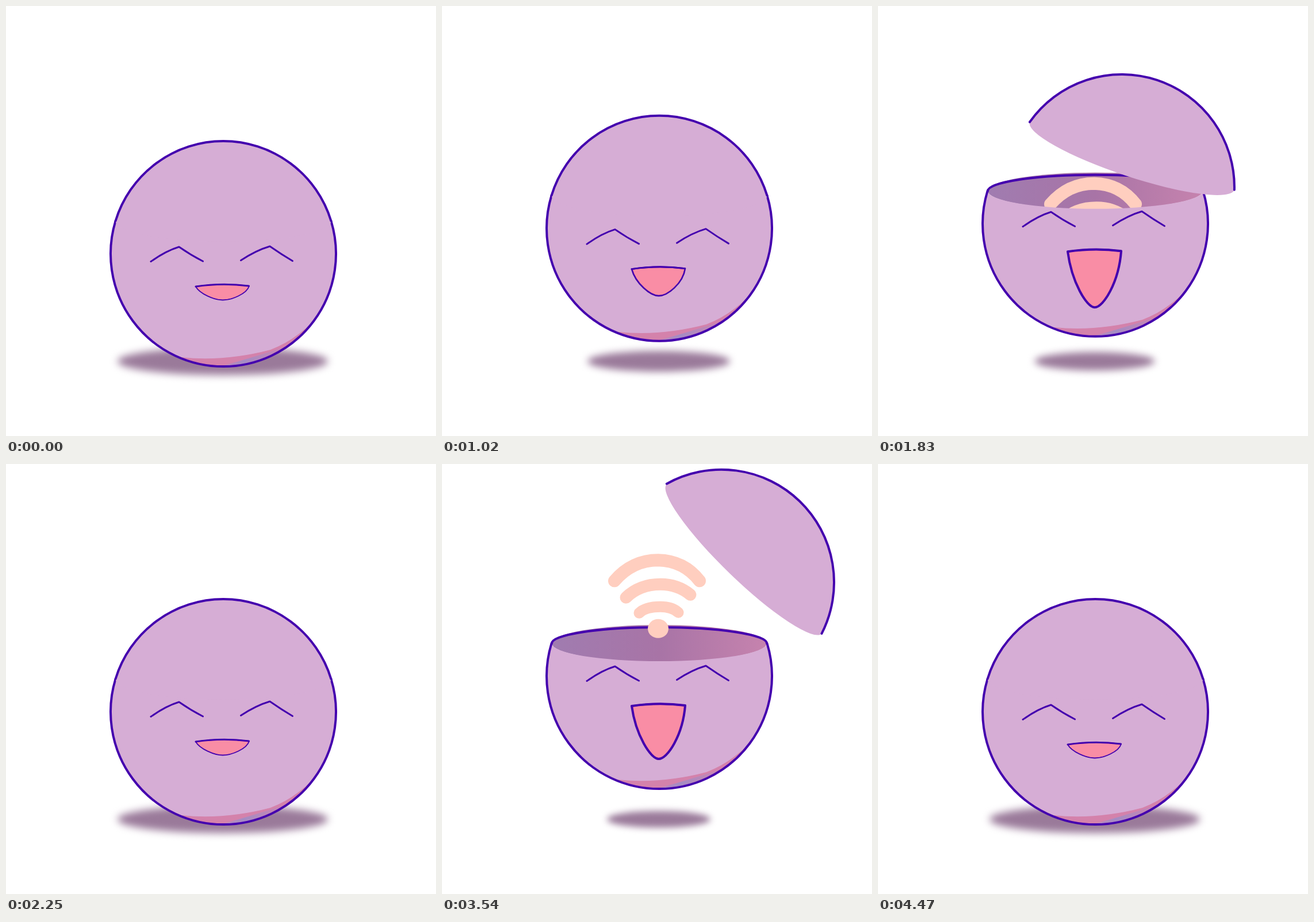
Write an HTML page that moves like this. It is 748 by 748 pixels and loops after 4.5 s.

```html
<!DOCTYPE html>
<html lang="en">
<head>
<meta charset="utf-8">
<title>Bouncing ball</title>
<style>
html, body { margin: 0; width: 100%; height: 100%; overflow: hidden; background: #fff; }
svg { display: block; width: 100vw; height: 100vh; }
.line { fill: none; stroke: #4400ae; stroke-width: 4; stroke-linecap: round; stroke-linejoin: round; }
.skin { fill: #d6add5; }
.thin { stroke-width: 3; }
#wifi path { fill: none; stroke: #ffcebf; stroke-width: 21; stroke-linecap: round; }
</style>
</head>
<body>
<svg viewBox="0 0 748 748">
  <defs>
    <linearGradient id="hollow">
      <stop offset="0" stop-color="#a07cb0"/>
      <stop offset=".5" stop-color="#a874a6"/>
      <stop offset="1" stop-color="#c683ae"/>
    </linearGradient>
    <linearGradient id="glint">
      <stop offset="0" stop-color="#c488b6"/>
      <stop offset=".35" stop-color="#a48cc4"/>
      <stop offset="1" stop-color="#d084ae"/>
    </linearGradient>
  </defs>
  <ellipse id="shadow" cx="377" cy="618" fill="#9a7a9a"/>
  <g id="body">
    <circle id="plate" class="skin" cx="378" cy="431" r="196"/>
    <g id="inside">
      <ellipse cx="378" cy="374" rx="187" ry="32" fill="url(#hollow)"/>
      <path class="line" d="M191 374A187 28 0 0 1 565 374"/>
      <g id="wifi" fill="#ffcebf">
        <path d="M300 265Q331 229 376 229Q421 230 448 265" style="stroke-width:22"/>
        <path d="M320 294Q344 271 380 271Q410 271 432 289"/>
        <path d="M343 321Q354 310 380 310Q400 310 411 320" style="stroke-width:19"/>
        <ellipse cx="376" cy="348" rx="18" ry="16.500"/>
      </g>
    </g>
    <path class="skin" d="M190.500 374A196 196 0 1 0 565.500 374A187.500 31 0 0 1 190.500 374"/>
    <path fill="#d482ab" d="M305 611Q380 619 460 598Q500 583 534 549A196 196 0 0 1 305 613"/>
    <path fill="url(#glint)" d="M372 627Q440 609 492 590A196 196 0 0 1 372 627"/>
    <path class="line" d="M190.500 374A196 196 0 1 0 565.500 374"/>
    <g id="lid">
      <path class="skin" d="M190.500 374A196 196 0 0 1 565.500 374A187.500 36 0 0 1 190.500 374"/>
      <path class="line" d="M190.500 374A196 196 0 0 1 565.500 374"/>
    </g>
  </g>
  <g id="face">
    <path class="line thin" d="M252 439.500Q278 421 301 414Q321 428 342.500 439"/>
    <path class="line thin" d="M408.500 437.500Q435 420 459 413Q479 427 498.500 438.500"/>
    <path id="mouth" class="line" style="fill:#f98da5"/>
    <path class="line thin" d="M330 483Q376 476 422.500 482"/>
  </g>
</svg>
<script>
const LOOP = 4500, STEP = 30, RISE = 62;
const el = id => document.getElementById(id);
const [shadow, body, plate, inside, wifi, lid, face, mouth] =
  ['shadow', 'body', 'plate', 'inside', 'wifi', 'lid', 'face', 'mouth'].map(el);

const mix = (a, b, k) => a + (b - a) * k;
const span = (u, from, to) => Math.min(1, Math.max(0, (u - from) / (to - from)));
const cubic = x => x < .5 ? 4 * x ** 3 : 1 - 4 * (1 - x) ** 3;
const sine = x => (1 - Math.cos(Math.PI * x)) / 2;
const outCubic = x => 1 - (1 - x) ** 3;
const move = (node, x, y, extra = '') =>
  node.setAttribute('transform', `translate(${x} ${y}) ${extra}`);

function draw(t) {
  const second = t >= 2700;
  let u = Math.max(0, t - (second ? 2700 : 660));
  // The second landing is slower than the first
  if (second && u > 960) u = 960 + (u - 960) * 630 / 810;

  const drop = cubic(span(u, 1000, 1500));
  const up = cubic(span(u, 0, 615)) - drop;
  const small = cubic(span(u, 0, 655)) - drop;
  move(body, 0, -RISE * up);
  shadow.setAttribute('rx', mix(183, 90, small));
  shadow.setAttribute('ry', mix(24, 14.5, small));
  shadow.style.filter = `blur(${mix(7, 6, small)}px)`;

  const back = sine(span(u, 860, 1420));
  const open = cubic(span(u, 400, 600)) * (1 - back);
  const drift = sine(span(u, 570, 960)) * (1 - back);
  move(lid, 126.5 * open + 27 * drift, -150.5 * open + 4 * drift, `rotate(${44 * open} 378 374)`);
  const closed = open < .0005;
  plate.style.display = closed ? '' : 'none';
  inside.style.display = closed ? 'none' : '';
  const out = outCubic(span(u, 420, 900)) - sine(span(u, 860, 1300));
  move(wifi, 0, 165 * (1 - out));

  const rest = second && u > 960 ? 5 : 0;
  const settle = 5 * (1 - sine(span(t, 0, 620)));
  const lift = cubic(span(u, 114, 640));
  const land = cubic(span(u, 1000, 1580));
  move(face, 0, t < 660 ? settle : mix(-RISE * lift, rest, land));

  const grow = Math.min(u, 960);
  const gape = (.0506 * grow + .000037 * grow ** 2) * (1 - span(u, 960, 1590) ** 2);
  const depth = 23.5 + gape, low = 483 + depth, mid = 483 + depth * .55;
  mouth.setAttribute('d', `M330 483C337 ${mid} 363 ${low} 377 ${low}` +
    `C392 ${low} 419 ${mid} 423 482Q376 476 330 483`);
  mouth.style.strokeWidth = mix(1.8, 4, Math.min(1, gape / 60));
}

function tick() {
  draw(Math.floor(performance.now() % LOOP / STEP) * STEP);
  requestAnimationFrame(tick);
}
tick();
</script>
</body>
</html>
```
